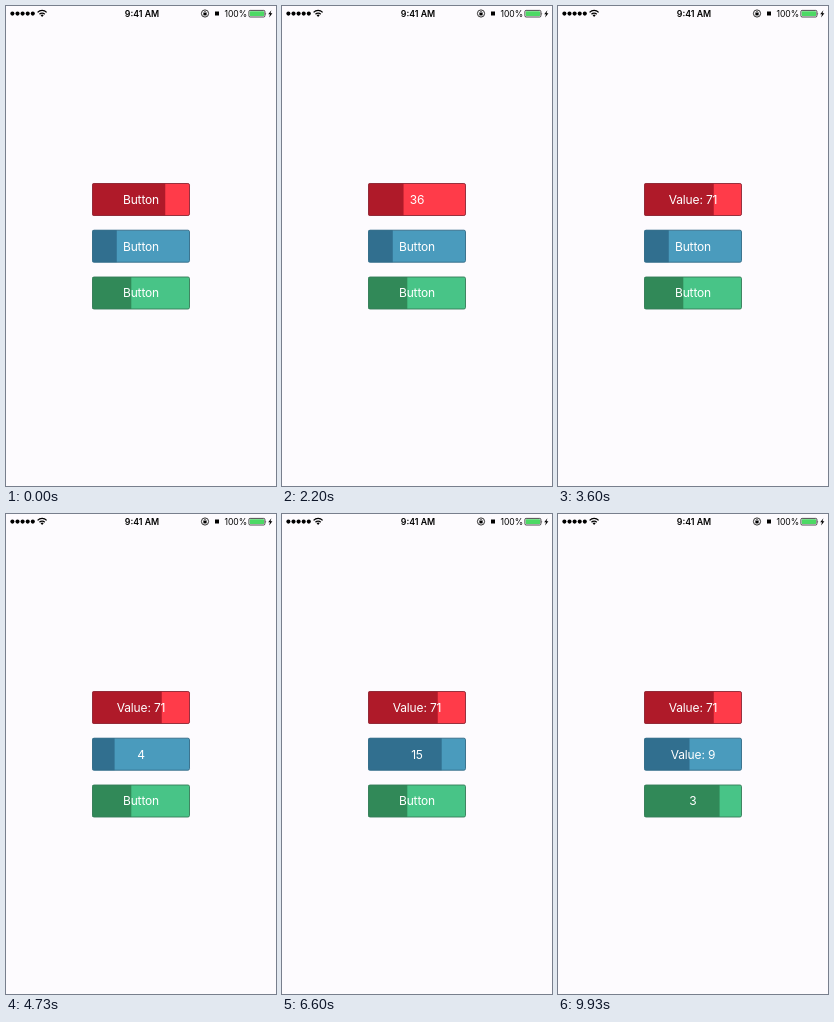
Recreate the animation shown at these times as an HTML page. Size 270 px wide and 480 px high, loop 9990 ms.

```html
<!DOCTYPE html>
<html lang="en">
<head>
<meta charset="utf-8">
<title>Slider buttons</title>
<style>
  html, body { margin: 0; width: 100%; height: 100%; overflow: hidden; background: #fdfbfe; }
  svg { display: block; width: 100vw; height: 100vh; }
  text { font-family: Inter, Roboto, sans-serif; }
  .label { font-size: 12px; letter-spacing: -.15px; fill: #fff; text-anchor: middle; }
  .clock { font-size: 8.8px; font-weight: 600; text-anchor: middle; }
  .level { font-size: 8.6px; letter-spacing: -.1px; }
  .line { fill: none; stroke: #000; }
</style>
</head>
<body>
<svg viewBox="0 0 270 480">
  <g id="status">
    <g id="dots"></g>
    <g class="line" stroke-width="1.3">
      <path d="M31.6 6.4a6.2 6.2 0 0 1 9 0"/>
      <path d="M33.5 8.2a3.6 3.6 0 0 1 5.2 0"/>
    </g>
    <path d="M34.6 9.3a2.2 2.2 0 0 1 3 0l-1.5 1.7z"/>
    <text class="clock" x="136" y="10.6">9:41 AM</text>
    <g class="line" stroke-width=".8">
      <circle cx="199" cy="7.5" r="3.6"/>
      <path d="M198 7.2v-.6a1 1 0 0 1 2 0v.6"/>
    </g>
    <rect x="197.4" y="7" width="3.2" height="2.4"/>
    <rect x="209" y="5.5" width="4" height="4"/>
    <text class="level" x="218.6" y="10.6" textLength="">100%</text>
    <rect class="line" x="242.9" y="4.4" width="16" height="6.6" rx="1.2" stroke-width=".7"/>
    <rect x="243.8" y="5.3" width="14.2" height="4.8" rx=".5" fill="#4cd964"/>
    <path d="M259.6 6.4q1.2 1.3 0 2.6z"/>
    <path d="M265.4 4.2l-3.2 4h1.8l-.9 3.2 3.3-4.1h-1.9z"/>
  </g>
  <g id="buttons"></g>
</svg>
<script>
const LOOP = 9990, LEFT = 86.5, WIDTH = 97, HEIGHT = 32;
const NS = 'http://www.w3.org/2000/svg';

// path: [time, percent] turning points of the drag
const sliders = [
  { y: 177.5, max: 100, light: '#ff3b49', dark: '#af1a29', edge: '#8c2534',
    down: 270, up: 3500,
    path: [[270, 75], [950, 0], [1350, 20], [1670, 11], [1870, 11], [2750, 92], [3380, 71.4]] },
  { y: 224.2, max: 20, light: '#4a9bbd', dark: '#316f8f', edge: '#326a86',
    down: 4500, up: 7650,
    path: [[4500, 25], [5200, 16], [5340, 16], [5900, 93], [7567, 46.4]] },
  { y: 271, max: 5, light: '#48c487', dark: '#318958', edge: '#357b57',
    down: 8500, up: LOOP,
    path: [[8500, 40], [8920, 28], [9560, 88], [9920, 77.4]] }
];

function add(parent, tag, attrs) {
  const el = document.createElementNS(NS, tag);
  for (const key in attrs) el.setAttribute(key, attrs[key]);
  return document.getElementById(parent).appendChild(el);
}

function percentAt(path, t) {
  if (t <= path[0][0]) return path[0][1];
  for (let i = 1; i < path.length; i++) {
    const [t0, a] = path[i - 1], [t1, b] = path[i];
    if (t < t1) return a + (b - a) * (1 - Math.cos(Math.PI * (t - t0) / (t1 - t0))) / 2;
  }
  return path[path.length - 1][1];
}

for (let i = 0; i < 5; i++) add('dots', 'circle', { cx: 6.4 + i * 5.1, cy: 7.6, r: 2.05 });
document.querySelector('.level').removeAttribute('textLength');

for (const s of sliders) {
  const box = { x: LEFT, y: s.y, width: WIDTH, height: HEIGHT, rx: 1.6 };
  add('buttons', 'rect', { ...box, fill: s.light });
  s.fill = add('buttons', 'rect', { ...box, rx: 0, fill: s.dark });
  add('buttons', 'rect', { ...box, fill: 'none', stroke: s.edge, 'stroke-width': .9 });
  s.label = add('buttons', 'text', { class: 'label', x: 135, y: s.y + 20.4 });
}

function draw(t) {
  for (const s of sliders) {
    const pct = percentAt(s.path, t);
    const value = Math.floor(pct / 100 * s.max + 1e-6);
    s.fill.setAttribute('width', WIDTH * pct / 100);
    s.label.textContent = t < s.down ? 'Button' : t < s.up ? value : 'Value: ' + value;
  }
}

const start = performance.now();
function tick() {
  draw((performance.now() - start) % LOOP);
  requestAnimationFrame(tick);
}
tick();
</script>
</body>
</html>
```
